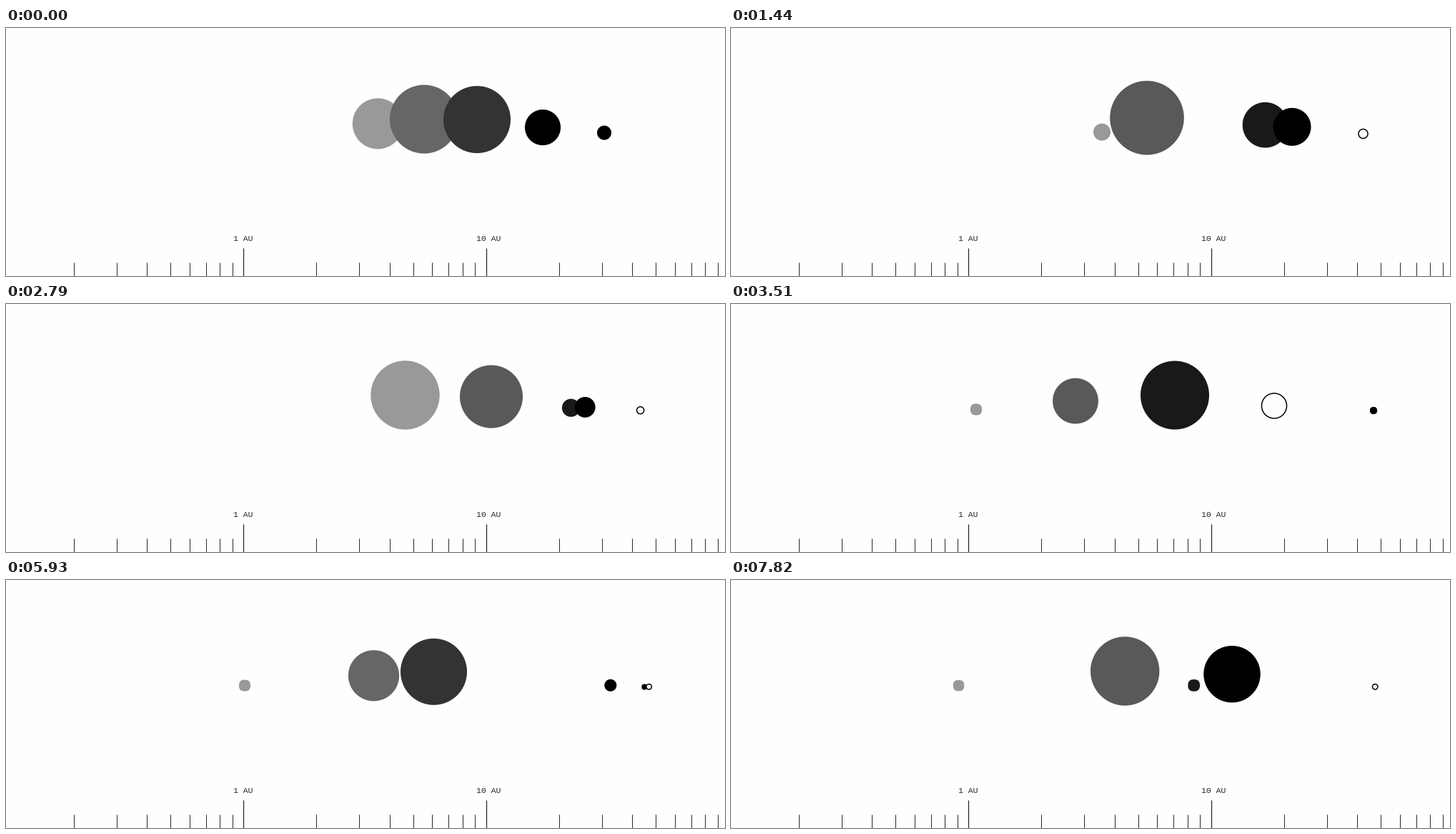
These frames come from a looping animation (1006x347 px, 8000 ms). A matplotlib script:

```python
import numpy as np
import matplotlib.pyplot as plt
from matplotlib.animation import FuncAnimation
from matplotlib.patches import Polygon

W, H, DPI = 1006, 347, 100
PX = 72 / DPI                      # one pixel in points
LOOP, STEP = 8000, 20
PAPER, INK = "#fefefe", "#2a2a2a"


def bell_system(inner, giant, n=5):
    """Evenly spaced planets whose sizes peak around the giants' zone."""
    x = np.linspace(inner, 899, n)
    r = 4 + (giant - 4) * np.exp(-((x - 590) / 160) ** 2)
    r[np.argmax(r)] = giant
    return list(zip(x, r))


# start (ms), index of the hollow planet, planets as (x, radius)
SYSTEMS = [
    (0, None, [(520.3, 35.5), (585, 48), (659, 47), (751, 25), (837, 10)]),
    (630, 4, bell_system(457, 51)),
    (1440, 4, [(519, 12), (582, 51.8), (747.5, 31.8), (785, 26.5),
               (884.5, 7.2)]),
    (2070, 4, bell_system(435, 48)),
    (2790, 4, [(558.5, 48.2), (679, 44), (790.5, 12.6), (810.2, 14.4),
               (887.6, 5.7)]),
    (3510, 3, bell_system(343, 48)),
    (4130, 4, bell_system(343, 63)),
    (4760, 3, [(323, 7.6), (520, 48.7), (672, 44.2), (757.7, 30.4),
               (885.5, 5.3)]),
    (5390, 5, bell_system(335, 51.5, 6)),
    (5930, 5, [(334, 8), (514.5, 35.6), (598.5, 46.5), (845.8, 8.5),
               (893.4, 4), (899.6, 4.4)]),
    (6560, 5, bell_system(338, 58, 6)),
    (7100, 4, [(338, 8.7), (498, 35.4), (625, 49.3), (763, 27.2),
               (811, 22.4), (825.3, 11.4), (901, 3.6)]),
    (7820, 4, [(318.5, 7.7), (551.2, 48.2), (647.7, 8.3), (701, 39.7),
               (901.2, 4.4)]),
]
STARTS = [start for start, _, _ in SYSTEMS]

fig = plt.figure(figsize=(W / DPI, H / DPI), dpi=DPI, facecolor=PAPER)
ax = fig.add_axes([0, 0, 1, 1])
ax.set_xlim(0, W)
ax.set_ylim(H, 0)
ax.axis("off")


def au_x(au):
    return 332.2 + 339.5 * np.log10(au)


def draw_scale():
    for unit in (.1, 1, 10):
        for k in range(1, 10):
            x = au_x(unit * k)
            major = k == 1
            if x < 0:
                continue
            ax.plot([x, x], [308 if major else 328, H + 2], color=INK,
                    lw=(1.3 if major else 1) * PX, solid_capstyle="butt")
            if major:
                ax.text(x - 13.8, 297.5, f"{unit} AU", color=INK,
                        family="Liberation Mono", size=11.5 * PX)


def planet(x, r, shade, hollow, order):
    y = 151.6 - r / 2              # larger planets sit higher
    # the smallest filled discs look slightly squarish
    power = 2.5 if r < 8.4 and not hollow else 2
    if hollow:
        r -= .7
    a = np.linspace(0, 2 * np.pi, 160, endpoint=False)
    c, s = np.cos(a), np.sin(a)
    px = x + r * np.sign(c) * np.abs(c) ** (2 / power)
    py = y + r * np.sign(s) * np.abs(s) ** (2 / power)
    patch = Polygon(np.column_stack([px, py]), zorder=order, visible=False,
                    fc=PAPER if hollow else str(shade),
                    ec="black" if hollow else "none",
                    lw=1.5 * PX if hollow else 0)
    return ax.add_patch(patch)


def build(hollow, planets):
    # shades darken outwards; a system without a hollow planet lost its last one
    fade = 1 / (len(planets) - (hollow is not None))
    return [planet(x, r, max(0, .6 - i * fade), i == hollow, 3 + i)
            for i, (x, r) in enumerate(planets)]


draw_scale()
groups = [build(hollow, planets) for _, hollow, planets in SYSTEMS]


def update(i):
    now = i * STEP + STEP / 2
    active = np.searchsorted(STARTS, now, side="right") - 1
    for k, group in enumerate(groups):
        for patch in group:
            patch.set_visible(k == active)
    return [patch for group in groups for patch in group]


anim = FuncAnimation(fig, update, frames=LOOP // STEP, interval=STEP,
                     init_func=lambda: update(0), repeat=True, repeat_delay=0)
plt.show()
```
